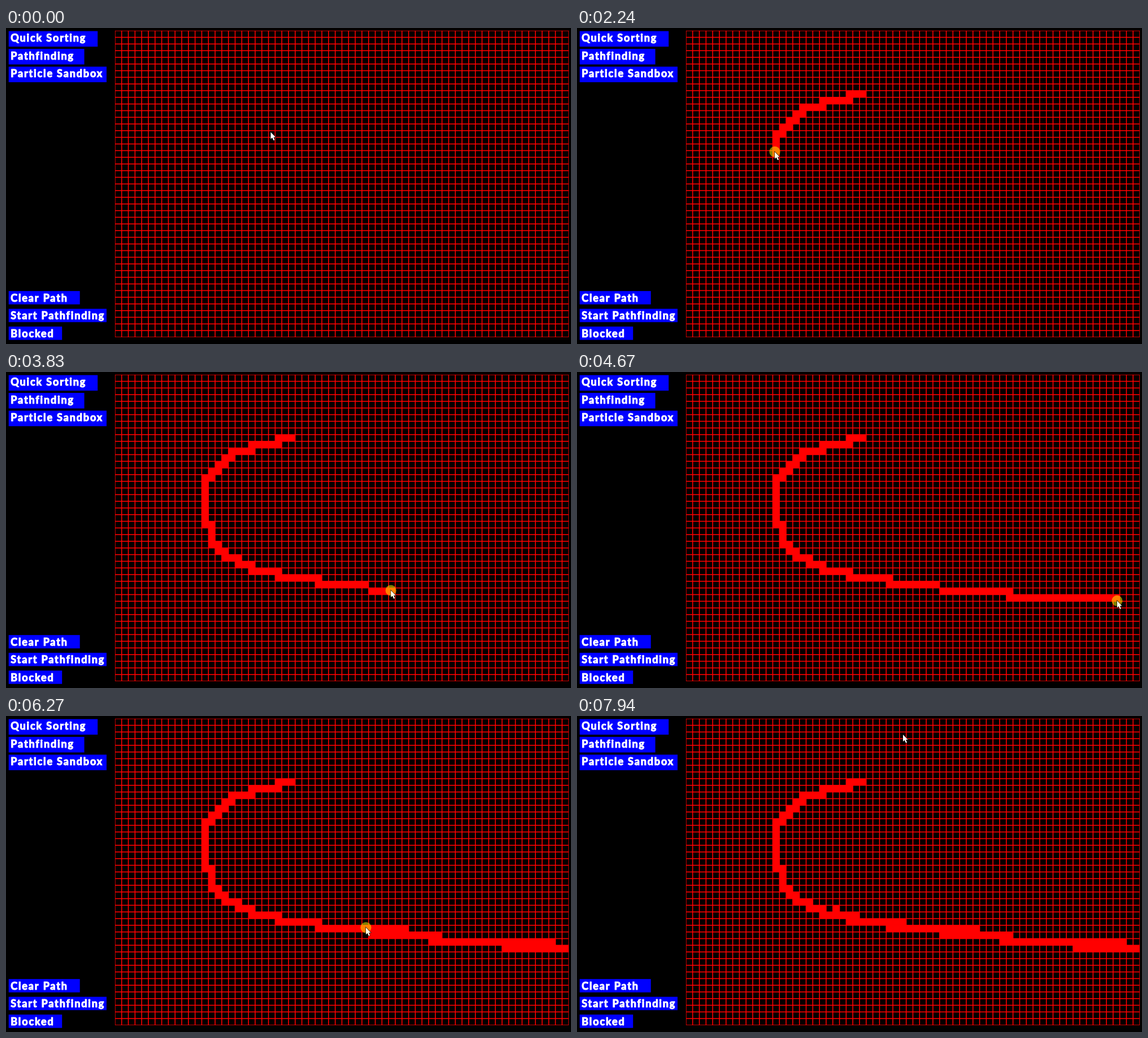
Animation, 1000 px wide and 560 px high, one loop 8 s. Source, as an HTML page with a canvas:

```html
<!DOCTYPE html>
<html lang="en">
<head>
<meta charset="utf-8">
<title>Pathfinding grid</title>
<style>
html, body { margin: 0; width: 100%; height: 100%; overflow: hidden; background: #000; }
canvas { display: block; }
</style>
</head>
<body>
<canvas id="stage" width="1000" height="560"></canvas>
<script>
const ctx = document.getElementById('stage').getContext('2d');
const LOOP = 8000, TICK = 69;
const PRESS = 820, RELEASE = 7110;

// The screen is laid out 1270 units wide and shown at 1000 pixels
const UNIT = 1000 / 1270;
const CELL = 15, COLS = 68, ROWS = 46, LEFT = 245, TOP = 6;

// Spans of time in which the pointer moves
const spans = [[130, 820], [1080, 5090], [5290, 7110], [7310, 7940]];

// Pointer path: time, x, y
const path = [
  [60, 468.5, 184.5], [360, 468, 203.5], [820, 509.5, 121.5], [1080, 507, 119],
  [1633, 441.5, 133], [1850, 385.5, 157.5], [2270, 350, 222], [2660, 368.5, 301.5],
  [2947, 401, 330], [3110, 437, 347], [3480, 529.5, 367.5], [3845, 681, 387],
  [4320, 893.5, 404.5], [4800, 970, 406], [5090, 989.5, 413.5], [5290, 988, 414],
  [5640, 842, 402.5], [5860, 757, 395.5], [6060, 697.5, 380], [6460, 583, 371],
  [6830, 480, 356], [6970, 458, 346.5], [7110, 453.5, 344.5], [7940, 577, 33]
];

const arrow = new Path2D('M0 0V12.3L2.8 9.8L5 14.8L7.1 13.9L5 9.1H8.6Z');

// The picture advances in equal ticks and rests between spans
function stepTime(t) {
  const span = spans.filter(s => s[0] <= t).pop();
  if (!span) return 0;
  const length = span[1] - span[0], steps = Math.round(length / TICK);
  const step = Math.floor((t - span[0]) / length * steps + 0.3);
  return span[0] + length * Math.min(1, step / steps);
}

// Slope at a key, flat at turning points
function slope(i, c) {
  const a = path[i - 1], k = path[i], b = path[i + 1];
  if (!a || !b || (k[c] - a[c]) * (b[c] - k[c]) <= 0) return 0;
  return (b[c] - a[c]) / (b[0] - a[0]);
}

function pointer(t) {
  const next = path.findIndex(k => k[0] > t);
  if (next < 1) return path[next ? path.length - 1 : 0].slice(1);
  const i = next - 1, a = path[i], b = path[next];
  const d = b[0] - a[0], u = (t - a[0]) / d;
  return [1, 2].map(c => a[c] + (b[c] - a[c]) * u * u * (3 - 2 * u)
    + d * u * (1 - u) * ((1 - u) * slope(i, c) - u * slope(next, c)));
}

// Every cell the pressed pointer crosses, with the time it is first reached
function traceCells() {
  const found = new Map();
  for (let time = PRESS; time <= RELEASE; time += 2) {
    const [x, y] = pointer(time);
    const col = Math.floor((x / UNIT - LEFT) / CELL);
    const row = Math.floor((y / UNIT - TOP) / CELL);
    const id = row * COLS + col;
    if (!found.has(id)) found.set(id, { col, row, time });
  }
  return [...found.values()];
}
const cells = traceCells();

function drawButtons(labels, widths, top, height) {
  ctx.font = '700 23px Lato, sans-serif';
  ctx.letterSpacing = '2.3px';
  ctx.lineJoin = 'round';
  ctx.lineWidth = 1.4;
  labels.forEach((label, i) => {
    const y = top + i * 40;
    ctx.fillStyle = '#00f';
    ctx.fillRect(6, y, widths[i], height);
    ctx.fillStyle = ctx.strokeStyle = '#fff';
    ctx.fillText(label, 10.5, y + 23.7);
    ctx.strokeText(label, 10.5, y + 23.7);
  });
}

// Each cell has a one-unit border, so inner lines are two units wide
function drawGrid(t) {
  const width = COLS * CELL, height = ROWS * CELL;
  ctx.save();
  ctx.translate(LEFT, TOP);
  ctx.beginPath();
  ctx.rect(0, 0, width, height);
  ctx.clip();
  ctx.fillStyle = '#f00';
  for (let c = 0; c <= COLS; c++) ctx.fillRect(c * CELL - 1, 0, 2, height);
  for (let r = 0; r <= ROWS; r++) ctx.fillRect(0, r * CELL - 1, width, 2);
  for (const { col, row, time } of cells) {
    if (time <= t) ctx.fillRect(col * CELL, row * CELL, CELL, CELL);
  }
  ctx.restore();
}

function drawPointer(x, y, pressed) {
  ctx.save();
  ctx.translate(x, y);
  if (pressed) {
    ctx.fillStyle = 'rgba(255, 255, 0, 0.5)';
    ctx.beginPath();
    ctx.arc(0, 0, 9.6, 0, Math.PI * 2);
    ctx.fill();
  }
  ctx.strokeStyle = '#000';
  ctx.lineWidth = 1.2;
  ctx.stroke(arrow);
  ctx.fillStyle = pressed ? '#ffffe4' : '#fff';
  ctx.fill(arrow);
  ctx.restore();
}

function draw(now) {
  const t = stepTime(now % LOOP);
  ctx.fillStyle = '#000';
  ctx.fillRect(0, 0, 1000, 560);
  ctx.save();
  ctx.scale(UNIT, UNIT);
  drawButtons(['Quick Sorting', 'Pathfinding', 'Particle Sandbox'], [200, 170, 220], 7, 35);
  drawButtons(['Clear Path', 'Start Pathfinding', 'Blocked'], [160, 220, 120], 592, 30);
  drawGrid(t);
  ctx.restore();
  drawPointer(...pointer(t), t >= PRESS && t < RELEASE);
}

const began = performance.now();
function tick() {
  draw(performance.now() - began);
  requestAnimationFrame(tick);
}
tick();
</script>
</body>
</html>
```
